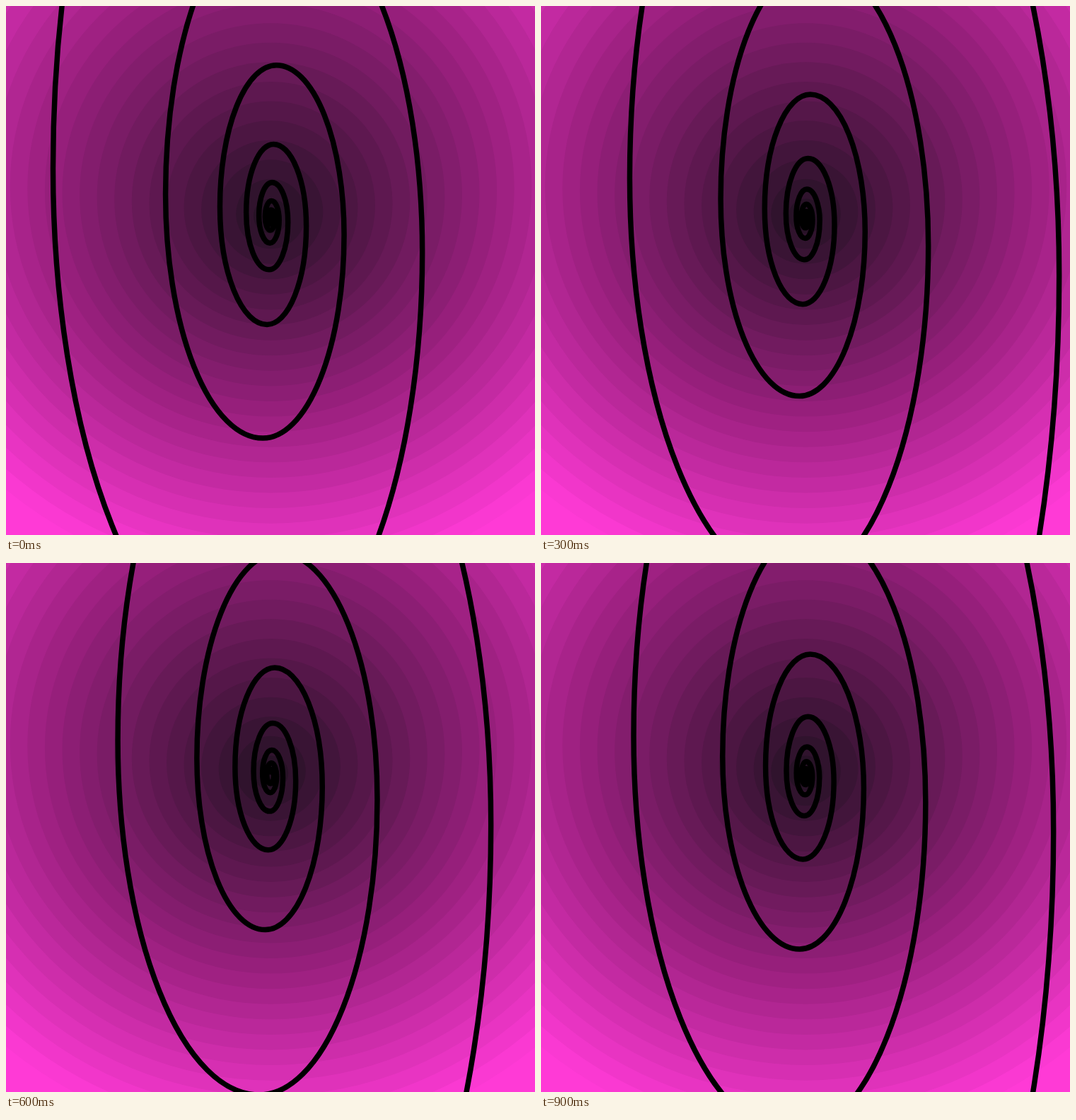
Recreate the animation shown at these times as an HTML page with a canvas. Size 748 px wide and 748 px high, loop 1000 ms.

```html
<!DOCTYPE html>
<html lang="en">
<head>
<meta charset="utf-8">
<title>Spiral</title>
<style>
  html, body { margin: 0; width: 100%; height: 100%; overflow: hidden; background: #ff3ad6; }
  canvas { display: block; width: 100vw; height: 100vh; }
</style>
</head>
<body>
<canvas id="stage" width="748" height="748"></canvas>
<script>
const ctx = document.getElementById('stage').getContext('2d');
const SIZE = 748, CX = 374.5, CY = 300;
const BANDS = 24, REACH = 590, LIFT = 72;
const GROWTH = 2.068 ** 0.25;                 // growth per quarter turn
const SKEW = (GROWTH - 1) / (GROWTH + 1);     // keeps neighbouring arcs tangent
const STRETCH = 2.505;

const DARK = [34, 17, 34], MID = [156, 32, 128], BRIGHT = [255, 58, 214];
const mix = (a, b, t) => `rgb(${a.map((v, i) => Math.round(v + (b[i] - v) * t))})`;
const shade = t => t < 0.55 ? mix(DARK, MID, t / 0.55) : mix(MID, BRIGHT, (t - 0.55) / 0.45);

function drawTunnel() {
  ctx.fillStyle = shade(1);
  ctx.fillRect(0, 0, SIZE, SIZE);
  for (let k = BANDS; k > 0; k--) {
    const t = k / BANDS;
    ctx.fillStyle = shade((k - 0.5) / BANDS);
    ctx.beginPath();
    ctx.arc(CX, CY - LIFT * t, REACH * t, 0, Math.PI * 2);
    ctx.fill();
  }
}

// Quarter arcs growing clockwise; left is the distance to one left-hand extreme.
function drawSpiral(left) {
  ctx.beginPath();
  for (let i = -28; i < 8; i++) {
    const a = Math.PI * (1 + i / 2), c = Math.cos(a), s = Math.sin(a);
    const x = left * GROWTH ** i;
    const u = -SKEW * GROWTH * x, v = SKEW * x, r = x - u;
    ctx.ellipse(CX + u * c - v * s, CY + (u * s + v * c) * STRETCH,
      r, r * STRETCH, 0, a, a + Math.PI / 2);
  }
  ctx.lineWidth = 7.5;
  ctx.strokeStyle = '#000';
  ctx.stroke();
}

// Slow shrink for six steps, then a faster one.
const leftAt = step => step < 6 ? 308 - 19.65 * step : 447.5 - 68 * (step - 6);

function frame(now) {
  drawTunnel();
  drawSpiral(leftAt(Math.floor(now % 1000 / 100)));
  requestAnimationFrame(frame);
}
frame(performance.now());
</script>
</body>
</html>
```
